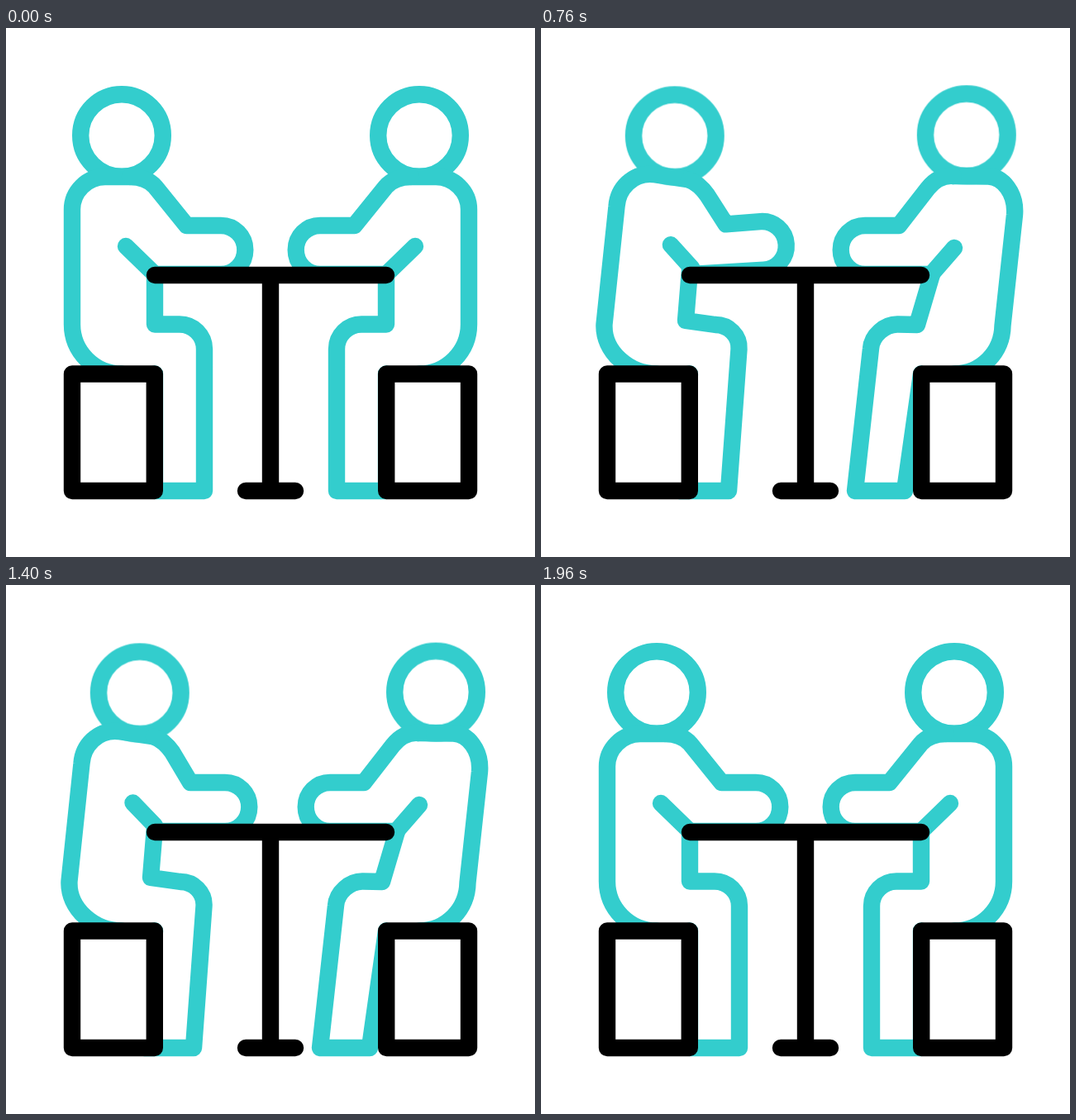
Animation, 640 px wide and 640 px high, one loop 2000 ms. Source, as an HTML page:

```html
<!DOCTYPE html>
<html lang="en">
<head>
<meta charset="utf-8">
<title>Two people talking at a table</title>
<style>
  html, body { margin: 0; width: 100%; height: 100%; overflow: hidden; background: #fff; }
  svg { display: block; width: 100vw; height: 100vh; }

  svg * {
    stroke-width: 20.4;
    stroke-linecap: round;
    stroke-linejoin: round;
  }
  .person { fill: none; stroke: #33cdcd; }
  .furniture { fill: none; stroke: #000; }
  .stool { fill: #fff; }

  /* Upright pose, shared by both people (the right one is mirrored) */
  .person {
    --torso: path("M140 418.5 C107 418.5 80 391.5 80 358.5 L80 219.5 C80 198 98 180 120 180 L150 180");
    --arm: path("M150 180 C162 180 173 183.5 180.5 192 L218.5 239 L260 239 C276.3 239 289.3 252 289.3 268.5 C289.3 285 276.3 298 260 298 L180 298");
    --leg: path("M145 264 L180 298 L180 300 L180 358.5 L210 358.5 C226.5 358.5 240 372 240 388.5 L240 560 L180 560 L180 418.5");
  }
  .torso { d: var(--torso); }
  .arm { d: var(--arm); }
  .leg { d: var(--leg); }

  .person * { animation: 2s cubic-bezier(.333, 0, .667, 1) infinite; }

  .left .head { animation-name: left-head; }
  .left .torso { animation-name: left-torso; }
  .left .arm { animation-name: left-arm; }
  .left .leg { animation-name: left-leg; }
  .right .head { animation-name: right-head; }
  .right .torso { animation-name: right-torso; }
  .right .arm { animation-name: right-arm; }
  .right .leg { animation-name: right-leg; }

  /* Left: leans in quickly, raises the arm, leans back */
  @keyframes left-head {
    0%, 4%, 98%, 100% { transform: translate(0, 0); }
    16%, 72% { transform: translate(21.8px, .4px); }
  }
  @keyframes left-torso {
    0%, 4%, 98%, 100% { d: var(--torso); }
    16%, 72% { d: path("M140 418.5 C107 418.5 75 392 76.5 358.5 L91.5 216 C93 194 111 175 135.5 177 L179 183.5"); }
  }
  @keyframes left-arm {
    0%, 4%, 98%, 100% { d: var(--arm); }
    16%, 30%, 70%, 72% { d: path("M179 183.5 C188 187 196 195 201 202 L223 239 L265 239 C281.3 239 294.3 252 294.3 268.5 C294.3 285 281.3 298 265 298 L180 298"); }
    50% { d: path("M179 183.5 C188 187 196 195 201 202 L225 234.5 L266.4 225.3 C282.4 222.2 297.9 232.7 301 248.7 C304.1 264.7 293.6 280.2 277.6 283.3 L187 298"); }
  }
  @keyframes left-leg {
    0%, 4%, 98%, 100% { d: var(--leg); }
    16%, 30%, 70%, 72% { d: path("M153.5 263.5 L180 291 L180 293 L175 354 L211 359 C227 359 240.5 372 239.5 388.5 L227 560 L167 560 L180 418.5"); }
    50% { d: path("M163 260 L187 290 L180 293 L175 354 L211 359 C227 359 240.5 372 239.5 388.5 L227 560 L167 560 L180 418.5"); }
  }

  /* Right: leans back slowly, nods, returns */
  @keyframes right-head {
    0%, 4%, 98%, 100% { transform: translate(0, 0); }
    30%, 70%, 72% { transform: translate(-20px, -.4px); }
    50% { transform: translate(-5.4px, -1.3px); }
  }
  @keyframes right-torso {
    0%, 4%, 98%, 100% { d: var(--torso); }
    30%, 72% { d: path("M140 418.5 C107 418.5 82 392 81.5 360 L67 226 C65 200 81 180 99 179.5 L141 179"); }
  }
  @keyframes right-arm {
    0%, 4%, 98%, 100% { d: var(--arm); }
    30%, 72% { d: path("M141 179 C154 178 164 184 172 194 L207 239 L248 239 C264.3 239 277.3 252 277.3 268.5 C277.3 285 264.3 298 248 298 L167 298"); }
  }
  @keyframes right-leg {
    0%, 4%, 98%, 100% { d: var(--leg); }
    30%, 72% { d: path("M140 266 L167 297 L167 298 L185 359 L208 358.5 C224 358 240 372 241 388 L260 560 L200 560 L180 418.5"); }
  }
</style>
</head>
<body>
<svg viewBox="0 0 640 640">
  <g class="person left">
    <circle class="head" cx="140" cy="130" r="49.8"/>
    <path class="torso"/>
    <path class="arm"/>
    <path class="leg"/>
  </g>
  <g class="person right" transform="matrix(-1 0 0 1 640 0)">
    <circle class="head" cx="140" cy="130" r="49.8"/>
    <path class="torso"/>
    <path class="arm"/>
    <path class="leg"/>
  </g>
  <g class="furniture">
    <rect class="stool" x="80" y="418.5" width="99.8" height="141.5"/>
    <rect class="stool" x="460.2" y="418.5" width="99.8" height="141.5"/>
    <path d="M180 299 H460 M320 299 V560 M290 560 H350"/>
  </g>
</svg>
</body>
</html>
```
